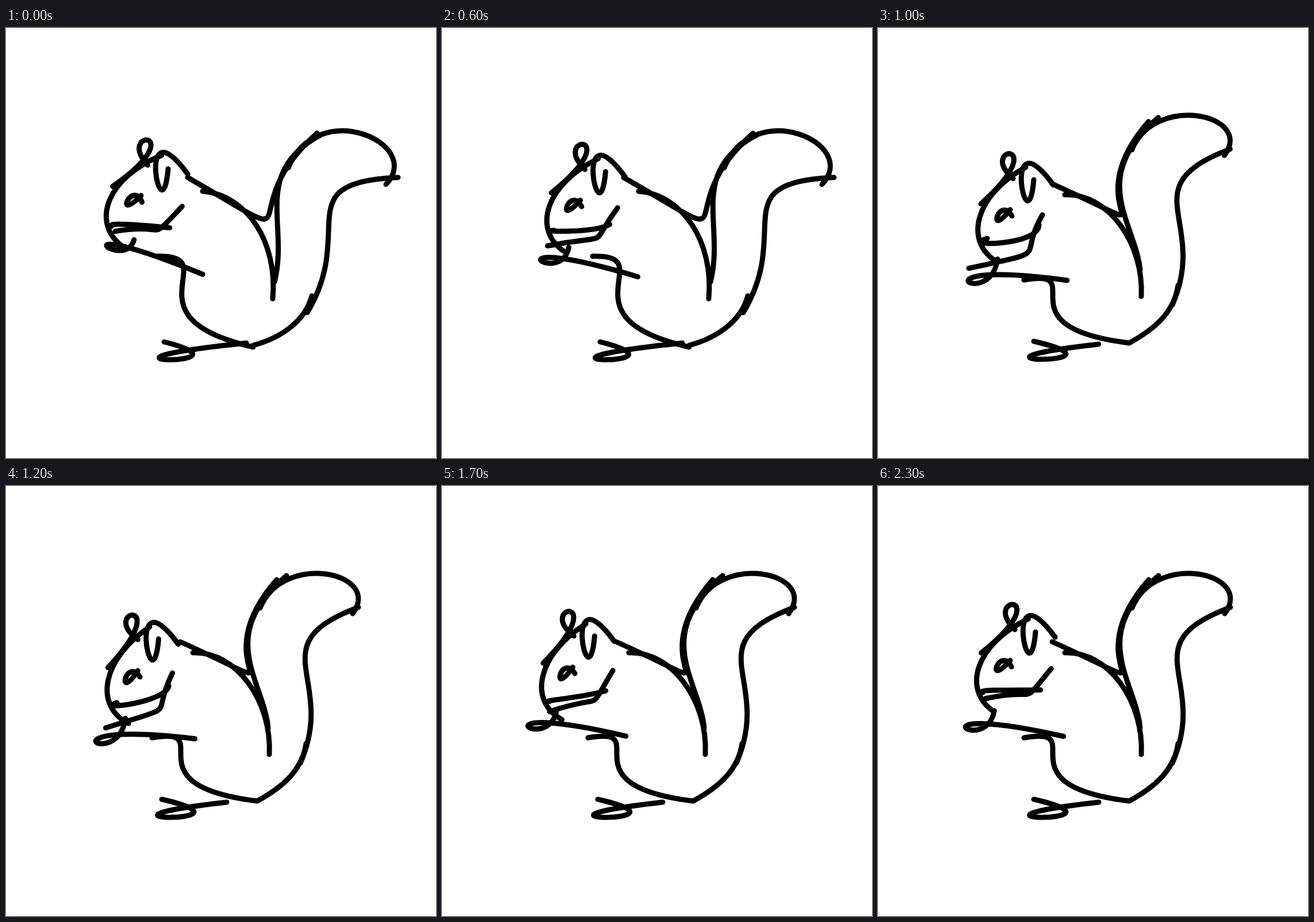
An HTML page with a canvas for the animation above (2400 ms loop, 748 by 748 pixels).

```html
<!DOCTYPE html>
<html lang="en">
<head>
<meta charset="utf-8">
<title>Squirrel sketch</title>
<style>
html, body { margin: 0; width: 100%; height: 100%; overflow: hidden; background: #fff; }
canvas { display: block; }
</style>
</head>
<body>
<canvas id="stage" width="748" height="748"></canvas>
<script>
const ctx = document.getElementById("stage").getContext("2d");
const STEP = 100, STEPS = 24;
const EAR = { x: 271, y: 264 };   // the head turns about this point

// Key poses: hand is 0 raised to 1 lowered, jaw is 0 closed to 1 open, tilt in degrees.
const keys = [
  { step: 0,  jaw: .1,  hand: .25, handX: 8,   headX: 11,  headY: -19, tilt: 7 },
  { step: 4,  jaw: 0,   hand: 0,   handX: 0,   headX: 20,  headY: -19, tilt: 10 },
  { step: 8,  jaw: 1,   hand: 1.1, handX: 17,  headX: 7,   headY: -9,  tilt: -3.5 },
  { step: 10, jaw: 1,   hand: 1,   handX: 0,   headX: 0,   headY: 0,   tilt: 0 },
  { step: 14, jaw: .6,  hand: 1.1, handX: 0,   headX: -11, headY: 4,   tilt: -10 },
  { step: 20, jaw: 0,   hand: .35, handX: -22, headX: 0,   headY: -10, tilt: 3.5 },
  { step: 23, jaw: .15, hand: .75, handX: -8,  headX: 3,   headY: -10, tilt: 3.5 }
];

const mix = (a, b, t) => a + (b - a) * t;
const blend = (from, to, t) => from.map((v, i) => mix(v, to[i], t));

function poseAt(step) {
  const i = Math.max(1, keys.findIndex(k => k.step >= step));
  const a = keys[i - 1], b = keys[i], t = (step - a.step) / (b.step - a.step);
  const pose = {};
  for (const name in a) pose[name] = mix(a[name], b[name], t);
  // the body snaps upright, overshoots and settles
  pose.up = step < 7 ? 0 : 1 + .5 * Math.exp(-1.4 * (step - 7));
  return pose;
}

// Turn a curve about the ear, then shift it.
function move(curve, dx, dy, degrees = 0) {
  const c = Math.cos(degrees * Math.PI / 180), s = Math.sin(degrees * Math.PI / 180);
  const out = [];
  for (let i = 0; i < curve.length; i += 2) {
    const x = curve[i] - EAR.x, y = curve[i + 1] - EAR.y;
    out.push(EAR.x + dx + x * c - y * s, EAR.y + dy + x * s + y * c);
  }
  return out;
}

function curve([x, y, ...rest]) {
  ctx.moveTo(x, y);
  ctx.bezierCurveTo(...rest);
}

function drawBody({ up }) {
  const part = (low, high) => curve(blend(low, high, up));
  // belly, foot, rump
  part([262,397, 385,393, 200,503, 430,555], [254,438, 374,417, 207,520, 437,548]);
  part([275,546, 452,590, 72,584, 418,548], [271,545, 459,588, 86,584, 384,550]);
  part([532,466, 520,512, 475,540, 430,552], [522,448, 515,496, 479,525, 437,548]);
  // tail: right side, top, left side
  part([682,260, 487,269, 611,351, 524,495], [613,211, 438,277, 577,334, 512,482]);
  part([491,243, 542,119, 728,201, 661,272], [442,212, 482,113, 656,151, 603,222]);
  part([551,184, 425,250, 493,340, 467,442], [488,156, 363,261, 449,340, 456,421]);
  // neck running up into the tail, back
  part([316,260, 550,395, 383,325, 541,183], [303,271, 538,376, 332,322, 471,163]);
  part([342,284, 418,290, 473,371, 464,471], [325,290, 402,287, 463,377, 458,467]);
}

function drawHead({ headX, headY, tilt, jaw }) {
  const part = shape => curve(move(shape, headX, headY, tilt));
  const jawPart = (closed, open) => part(blend(closed, open, jaw));
  curve(move([271,264, 260,388, 213,147, 305,273], headX, headY));   // near ear stays level
  part([179,306, 308,190, 170,205, 235,262]);   // far ear
  part([257,242, 170,290, 148,370, 206,406]);   // outline
  part([233,327, 211,290, 188,369, 230,316]);   // eye
  // mouth, cheek
  jawPart([185,376, 180,368, 233,365, 287,368], [190,366, 140,380, 280,380, 280,342]);
  jawPart([305,326, 249,400, 285,352, 197,379], [286,325, 240,405, 310,385, 158,418]);
}

function drawArm({ hand, handX }) {
  const arm = blend([217,357, 200,405, 70,290, 336,425], [208,402, 195,495, 45,400, 329,439], hand);
  curve(move(arm, handX, 0));
}

function draw(now) {
  const pose = poseAt(Math.floor(now / STEP) % STEPS);
  ctx.fillStyle = "#fff";
  ctx.fillRect(0, 0, 748, 748);
  ctx.lineWidth = 9;
  ctx.lineCap = ctx.lineJoin = "round";
  ctx.beginPath();
  drawBody(pose);
  drawHead(pose);
  drawArm(pose);
  ctx.stroke();
}

const start = performance.now();
function tick() {
  draw(performance.now() - start);
  requestAnimationFrame(tick);
}
tick();
</script>
</body>
</html>
```
